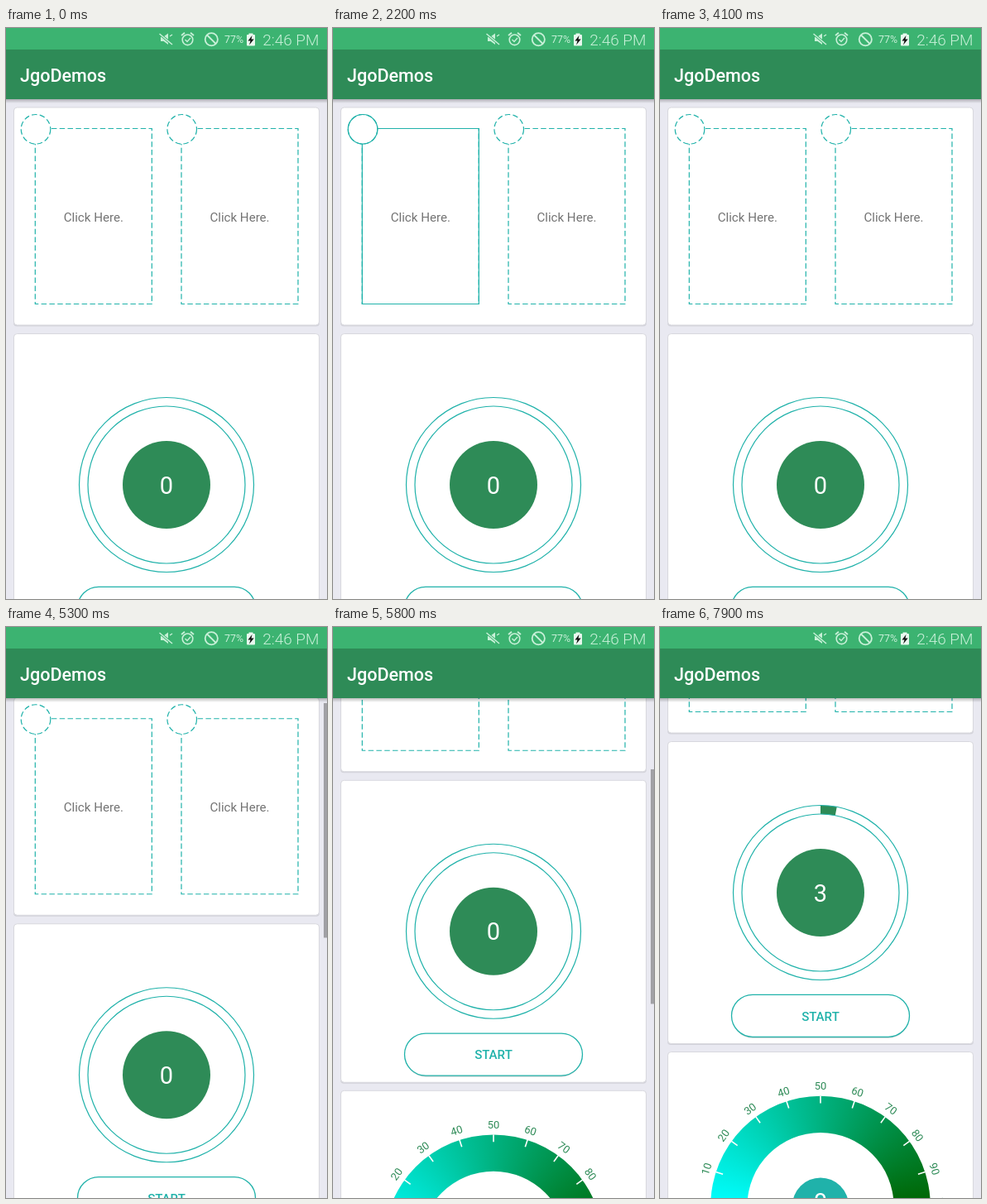
An HTML page with a canvas for the animation above (8000 ms loop, 388 by 690 pixels).

```html
<!DOCTYPE html>
<html lang="en">
<head>
<meta charset="utf-8">
<title>JgoDemos</title>
<style>
html, body { margin: 0; width: 100%; height: 100%; overflow: hidden; background: #e9e9f1; }
canvas { display: block; }
</style>
</head>
<body>
<canvas id="stage" width="388" height="690"></canvas>
<script>
const c = document.getElementById('stage').getContext('2d');
const TAU = Math.PI * 2, LOOP = 8000;
const TEAL = '#20b2aa', GREEN = '#2e8b57', PALE = '#c8f0d8';
const SCROLL = [[5200, 0], [5300, 10.5], [5400, 36], [5500, 74], [5600, 115], [5700, 152],
  [5800, 184], [5900, 208], [6000, 223], [6100, 229.5], [6200, 231]];

const clamp = v => Math.min(1, Math.max(0, v));
const ramp = (t, a, b) => clamp((t - a) / (b - a));

function scrollAt(t) {
  let [t0, y0] = SCROLL[0];
  for (const [t1, y1] of SCROLL) {
    if (t < t1) return y0 + (y1 - y0) * ramp(t, t0, t1);
    [t0, y0] = [t1, y1];
  }
  return y0;
}

function paint(fill, stroke, width = 1.2) {
  if (fill) { c.fillStyle = fill; c.fill(); }
  if (stroke) { c.strokeStyle = stroke; c.lineWidth = width; c.stroke(); }
}

function box(x, y, w, h, r, fill, stroke, width) {
  c.beginPath();
  c.roundRect(x, y, w, h, r);
  paint(fill, stroke, width);
}

function disc(x, y, r, fill, stroke, width) {
  c.beginPath();
  c.arc(x, y, r, 0, TAU);
  paint(fill, stroke, width);
}

function line(points, stroke, width) {
  c.beginPath();
  points.forEach(([x, y]) => c.lineTo(x, y));
  paint(null, stroke, width);
}

function text(s, x, y, size, color, align = 'center', weight = 400) {
  c.font = `${weight} ${size}px Roboto, sans-serif`;
  c.textAlign = align;
  c.fillStyle = color;
  c.fillText(s, x, y);
}

function card(y, h) {
  box(9, y + 1, 370, h, 4, '#d3d3da');
  box(9.5, y + .5, 369, h - 1, 4, '#fff', '#d8d8de', 1);
}

// A dashed frame with a corner circle; a solid line is traced over it.
function frame(x, solid) {
  const shapes = [
    [() => c.rect(x, 121.5, 141, 212), 706],
    [() => c.arc(x + .7, 122.3, 17.8, 0, TAU), TAU * 17.8]
  ];
  for (const [trace, length] of shapes) {
    c.beginPath();
    trace();
    c.setLineDash([6.5, 3.3]);
    paint('#fff', TEAL);
    if (solid > 0) {
      c.setLineDash([length * solid, length * (1 - solid) + .01]);
      paint(null, TEAL);
    }
  }
  c.setLineDash([]);
  text('Click Here.', x + 70.5, 233.5, 15.1, '#737373');
}

function counter(t) {
  const x = 194, y = 552, n = t < 7590 ? 0 : 1 + Math.floor((t - 7590) / 130);
  if (n) {
    const a = -TAU / 4, b = a + n * TAU / 100;
    c.beginPath();
    c.arc(x, y, 105.5, a, b);
    c.arc(x, y, 95, b, a, true);
    paint(GREEN);
  }
  disc(x, y, 105.5, null, TEAL);
  disc(x, y, 95, null, TEAL);
  disc(x, y, 53, GREEN);
  text(n, x, 562.5, 29, '#fff');
}

function button(t) {
  box(87, 677, 214, 51, 25.5, 'rgba(0,0,0,.16)');
  box(86.5, 675.3, 215, 51, 25.5, '#fff', TEAL, 1.3);
  const grow = ramp(t, 7000, 7400);
  if (grow > 0 && t < 7500) {
    c.save();
    c.beginPath();
    c.roundRect(86.5, 675.3, 215, 51, 25.5);
    c.clip();
    disc(194, 701, 20 + 95 * grow, `rgba(0,0,0,${.1 * (1 - ramp(t, 7300, 7500))})`);
    c.restore();
  }
  text('START', 194, 706.7, 15.1, TEAL, 'center', 500);
}

function gauge() {
  c.save();
  c.translate(194, 930.5);
  const sweep = c.createConicGradient(Math.PI, 0, 0);
  sweep.addColorStop(0, '#0ff');
  sweep.addColorStop(.5, '#006400');
  c.beginPath();
  c.arc(0, 0, 132.8, Math.PI, TAU);
  c.arc(0, 0, 88.5, TAU, Math.PI, true);
  paint(sweep);
  for (let v = 0; v <= 100; v += 10) {
    c.save();
    c.rotate((v - 50) / 100 * Math.PI);
    if (v % 100) line([[0, -133], [0, -124]], '#fff', 1.6);
    text(v, 0, -140.3, 12.9, GREEN);
    c.restore();
  }
  disc(0, 0, 34, TEAL);
  text('0', 0, 5, 29, '#fff');
  c.restore();
}

function statusBar() {
  c.fillStyle = '#3cb371';
  c.fillRect(0, 0, 388, 26);
  // muted speaker
  c.beginPath();
  [[187, 10.5], [190.5, 10.5], [196, 6.5], [196, 20], [190.5, 16], [187, 16]].forEach(p => c.lineTo(...p));
  paint(PALE);
  line([[185.5, 7], [201, 20]], '#3cb371', 3);
  line([[185.5, 7], [201, 20]], PALE, 1.5);
  line([[198, 10], [201, 8]], PALE, 1.3);
  // alarm clock
  disc(219.5, 14.3, 6.3, null, PALE, 1.6);
  line([[212, 9], [216, 5.8]], PALE, 1.8);
  line([[227, 9], [223, 5.8]], PALE, 1.8);
  line([[216.5, 14], [219, 16.5], [223, 12]], PALE, 1.4);
  // blocked sign
  disc(248.3, 13.7, 7.6, null, PALE, 1.8);
  line([[243, 8.5], [253.6, 19]], PALE, 1.8);
  text('77%', 264, 18.3, 12.4, PALE, 'left');
  // battery
  box(291, 8, 10, 13.5, 1, '#e8f8ee');
  box(293.5, 6.5, 5, 2, 0, '#e8f8ee');
  c.beginPath();
  [[297.5, 9], [292.5, 15.5], [295.5, 15.5], [294, 20.5], [299.7, 13.5], [296.5, 13.5]].forEach(p => c.lineTo(...p));
  paint('#111');
  text('2:46 PM', 378.5, 21, 19, PALE, 'right', 300);
}

function toolbar() {
  const shade = c.createLinearGradient(0, 86, 0, 91);
  shade.addColorStop(0, 'rgba(0,0,0,.25)');
  shade.addColorStop(1, 'rgba(0,0,0,0)');
  c.fillStyle = shade;
  c.fillRect(0, 86, 388, 5);
  c.fillStyle = GREEN;
  c.fillRect(0, 26, 388, 60);
  text('JgoDemos', 17, 64.5, 21.56, '#fff', 'left', 500);
}

function draw(t) {
  const y = scrollAt(t);
  c.fillStyle = '#e9e9f1';
  c.fillRect(0, 0, 388, 690);
  c.save();
  c.translate(0, -y);
  card(95.5, 264);
  frame(35.3, ramp(t, 800, 2000) - ramp(t, 2200, 3500));
  frame(212, 0);
  card(369, 366);
  counter(t);
  button(t);
  card(744, 366);
  gauge();
  c.restore();
  if (y > 0) {
    c.fillStyle = `rgba(90,90,90,${.5 * (1 - ramp(t, 6650, 6900))})`;
    c.fillRect(384, 87 + y * .461, 4, 283.5);
  }
  toolbar();
  statusBar();
}

const start = performance.now();
function tick() {
  draw((performance.now() - start) % LOOP);
  requestAnimationFrame(tick);
}
tick();
</script>
</body>
</html>
```
